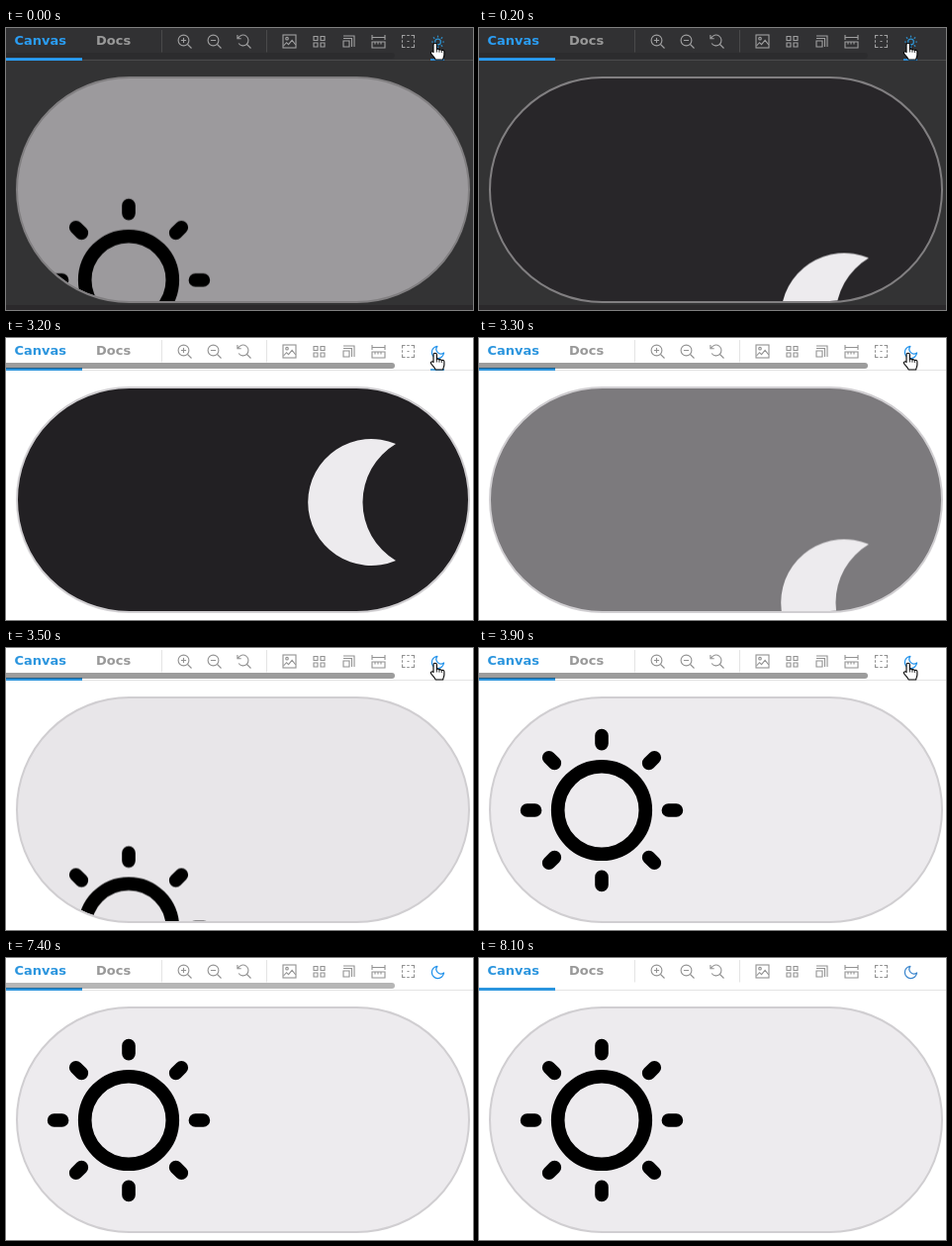
Write an HTML page that moves like this. It is 472x285 px and loops after 8.2 s.

```html
<!DOCTYPE html>
<html lang="en">
<head>
<meta charset="utf-8">
<title>Theme toggle</title>
<style>
  html, body { margin: 0; width: 100%; height: 100%; overflow: hidden; }
  svg { display: block; }

  /* All animations are paused; the script moves --delay in 100 ms ticks. */
  .anim {
    animation-duration: 8200ms;
    animation-timing-function: linear;
    animation-iteration-count: infinite;
    animation-play-state: paused;
    animation-delay: var(--delay, -100ms);
  }
  #stage { animation-name: theme; animation-timing-function: step-end; }
  #face { animation-name: face; }
  #sun { animation-name: sun; }
  #moon { animation-name: moon; }
  #thumb { animation-name: thumb; }

  @keyframes theme {
    0% {
      --page: #fff; --bar: #fff; --foot: #fff; --line: #e4e4e4; --edge: #d0ced1;
      --icon: #929292; --tab: #999; --blue: #2b95de; --hot: #3a85cc; --thumb: rgba(0,0,0,.39);
      --day: 0; --night: 1; --hand: 0; --focus: 0;
    }
    1.2% {
      --page: #333334; --bar: #313133; --foot: #2b292b; --line: #4a4a4b; --edge: #817f81;
      --icon: #a0a0a1; --tab: #999; --blue: #2a9df4; --hot: #2d93d2; --thumb: rgba(0,0,0,.09);
      --day: 1; --night: 0; --hand: 1; --focus: 1;
    }
    40.2% {
      --page: #fff; --bar: #fff; --foot: #fff; --line: #e4e4e4; --edge: #d0ced1;
      --icon: #929292; --tab: #999; --blue: #2b95de; --hot: #1e90ea; --thumb: rgba(0,0,0,.39);
      --day: 0; --night: 1; --hand: 1; --focus: 1;
    }
    41.4% { --focus: 0; }
    81.7% { --hand: 0; }
  }
  @keyframes face {
    0% { fill: #edebee; }
    .098% { fill: #edebee; animation-timing-function: ease; }
    4.671% { fill: #222023; }
    40.244% { fill: #222023; animation-timing-function: ease; }
    44.817%, 100% { fill: #edebee; }
  }
  @keyframes sun {
    0% { transform: translateY(0); }
    .098% { transform: translateY(0); animation-timing-function: ease; }
    4.671% { transform: translateY(228px); }
    42% { transform: translateY(228px); animation-timing-function: ease; }
    48.707%, 100% { transform: translateY(0); }
  }
  @keyframes moon {
    0% { transform: translateY(228px); }
    1.854% { transform: translateY(228px); animation-timing-function: ease; }
    8.561% { transform: translateY(0); }
    40.244% { transform: translateY(0); animation-timing-function: ease; }
    44.817%, 100% { transform: translateY(228px); }
  }
  @keyframes thumb {
    0% { opacity: 0; animation-timing-function: step-end; }
    1.2%, 90.6% { opacity: 1; }
    93.9%, 100% { opacity: 0; }
  }

  text { font: bold 13px "DejaVu Sans", sans-serif; }
  .icons { fill: none; stroke: var(--icon); stroke-width: 1.1; }
  .hot { fill: none; stroke: var(--hot); stroke-width: 1.2; stroke-linecap: round; stroke-linejoin: round; }
</style>
</head>
<body>
<svg id="stage" class="anim" width="472" height="285" viewBox="0 0 472 285">
  <defs>
    <clipPath id="inside"><rect x="12" y="51" width="455" height="225" rx="112.5"/></clipPath>
    <g id="lens"><circle cx="-1" cy="-1" r="5.4"/><path d="M3 3L7 7M-3.6-1H1.6"/></g>
  </defs>

  <rect width="472" height="285" style="fill:var(--page)"/>
  <rect width="472" height="32" style="fill:var(--bar)"/>
  <rect y="280" width="472" height="5" style="fill:var(--foot)"/>

  <!-- toolbar -->
  <path d="M0 32.5H472M157.5 2V24.5M263.5 2V24.5" style="stroke:var(--line)"/>
  <rect y="30" width="77" height="3" style="fill:var(--blue)"/>
  <text x="8.5" y="17" style="fill:var(--blue)">Canvas</text>
  <text x="91" y="17" style="fill:var(--tab)">Docs</text>

  <g class="icons">
    <g transform="translate(180.5 13.5)"><use href="#lens"/><path d="M-1-3.6V1.6"/></g>
    <use href="#lens" x="210.5" y="13.5"/>
    <path transform="translate(240.5 13.5)" d="M-5.8-3.4A5.4 5.4 0 1 1-5.4 2M-6.6-6.6V-2.8H-2.8M3 3L7 7"/>
    <g transform="translate(286.5 13.5)">
      <rect x="-6.5" y="-6.5" width="13" height="13"/>
      <circle cx="-2.5" cy="-2.8" r="1.3"/>
      <path d="M-6 4.5L-3 1.2-1 3.2 2.6-1.2 6.3 3.5"/>
    </g>
    <path transform="translate(316.5 13.5)" d="M-5.5-5h4v4h-4zM1.5-5h4v4h-4zM-5.5 1.5h4v4h-4zM1.5 1.5h4v4h-4z"/>
    <path transform="translate(346.5 13.5)" d="M-5.5-.5h6v6h-6zM-5.5-3H3V5.5M-5.5-5.5H5.5V5.5"/>
    <path transform="translate(376.5 13.5)" d="M-6.5-6.5v5M6.5-6.5v5M-6.5-4h13M-6.5.5h13v6h-13zM-3.5.5v2.5M-.5.5v2.5M2.5.5v2.5"/>
    <path transform="translate(406.5 13.5)" d="M-6-3V-6H-3M3-6H6V-3M6 3V6H3M-3 6H-6V3M-1.3-6H1.3M-1.3 6H1.3M-6-1.3V1.3M6-1.3V1.3M-1 0H1"/>
  </g>

  <g class="hot" style="opacity:var(--day)">
    <circle cx="436.5" cy="14" r="2.9"/>
    <path id="rays" d=""/>
  </g>
  <path class="hot" style="opacity:var(--night);stroke-width:1.8"
        transform="translate(428.3 6.3) scale(.68)"
        d="M21 12.8A9 9 0 1 1 11.2 3A7 7 0 0 0 21 12.8z"/>
  <rect x="429" y="31" width="14" height="2" style="fill:var(--blue);opacity:calc(var(--focus) * .8)"/>

  <path id="thumb" class="anim" d="M0 25H390a3 3 0 0 1 0 6H0z" style="fill:var(--thumb)"/>

  <!-- switch -->
  <rect id="face" class="anim" x="11" y="50" width="457" height="227" rx="113.5"/>
  <g clip-path="url(#inside)">
    <g id="sun" class="anim" fill="none" stroke="#000" stroke-width="13.6" stroke-linecap="round">
      <circle cx="124" cy="164" r="44.3"/>
      <path id="beams" d=""/>
    </g>
    <path id="moon" class="anim" fill="#edebee"
          d="M394 107A64 64 0 1 0 394 225A68.7 68.7 0 0 1 394 107z"/>
  </g>
  <rect x="11" y="50" width="457" height="227" rx="113.5" fill="none" stroke-width="2" style="stroke:var(--edge)"/>

  <!-- pointer -->
  <g style="opacity:var(--hand)" stroke="#000" stroke-linejoin="round">
    <path fill="#fff" stroke-width="1.1"
          d="M432 24.5V17a1.7 1.7 0 0 1 3.4 0v4.6c.6-.9 2.3-.6 2.5.4.7-.7 2.2-.4 2.4.6 1-.6 2.6 0 2.6 1.3v3.1c0 1.8-1 2.7-1.2 5h-7.6c-.4-2.2-2.6-3.4-4.2-5.8-1.6-1.8.7-3.2 2.1-1.7z"/>
    <path fill="none" stroke-width=".8" d="M435.4 21.6V24.5M437.9 22V24.7M440.3 22.6V25"/>
  </g>
</svg>

<script>
  const LOOP = 8200, TICK = 100, LEAD = 100;

  // Eight spokes around a centre, from radius a to radius b.
  function spokes(cx, cy, a, b) {
    let d = "";
    for (let i = 0; i < 8; i++) {
      const c = Math.cos(i * Math.PI / 4), s = Math.sin(i * Math.PI / 4);
      d += `M${cx + a * c} ${cy + a * s}L${cx + b * c} ${cy + b * s}`;
    }
    return d;
  }
  document.getElementById("beams").setAttribute("d", spokes(124, 164, 67.4, 75.4));
  document.getElementById("rays").setAttribute("d", spokes(436.5, 14, 5.1, 6));

  let last = -1;
  function draw(now) {
    const t = Math.floor(now / TICK) * TICK;
    if (t !== last) {
      last = t;
      document.documentElement.style.setProperty("--delay", -((t + LEAD) % LOOP) + "ms");
    }
    requestAnimationFrame(draw);
  }
  requestAnimationFrame(draw);
</script>
</body>
</html>
```
